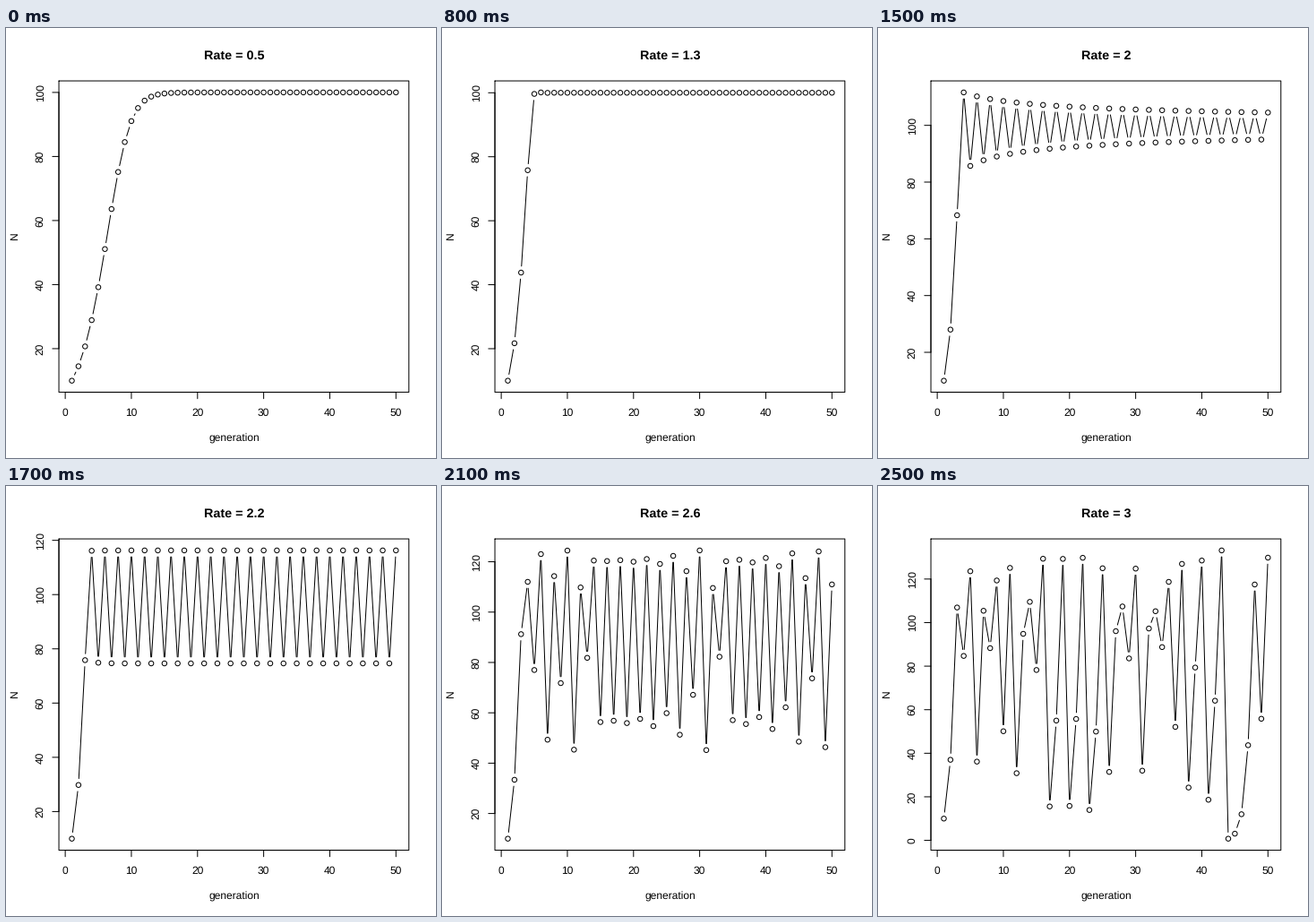
Animation of 480 by 480 pixels, one loop 2.6 s. Source, as a matplotlib script:

```python
import numpy as np
import matplotlib.pyplot as plt
from matplotlib.animation import FuncAnimation
from matplotlib.collections import LineCollection, PatchCollection
from matplotlib.patches import Circle

SIZE, DPI = 480, 72          # at 72 dpi one point is one pixel
LINE = 14.4                  # height of one margin line
LEFT, RIGHT = 4.1 * LINE, SIZE - 2.1 * LINE
TOP, BOTTOM = 4.1 * LINE, SIZE - 5.1 * LINE
MID_X, MID_Y = (LEFT + RIGHT) / 2, (TOP + BOTTOM) / 2
TICK, GAP, RADIUS = 7.2, 7.2, 2.7
CAPACITY, START, GENERATIONS = 100, 10, 50
FRAMES, INTERVAL = 26, 100

plt.rcParams.update({
    "font.family": "Liberation Sans",
    "font.size": 12,
    "text.hinting": "none",
    "toolbar": "None",
})

fig = plt.figure(figsize=(SIZE / DPI, SIZE / DPI), dpi=DPI, facecolor="white")
ax = fig.add_axes([0, 0, 1, 1])


def population(rate):
    """Discrete logistic growth."""
    n = [float(START)]
    for _ in range(GENERATIONS - 1):
        n.append(n[-1] + rate * n[-1] * (1 - n[-1] / CAPACITY))
    return np.array(n)


def padded(values):
    low, high = min(values), max(values)
    pad = 0.04 * (high - low)
    return low - pad, high + pad


def rescale(values, limits, start, end):
    low, high = limits
    return start + (np.asarray(values) - low) / (high - low) * (end - start)


def label(x, y, text, **style):
    ax.text(x, y, text, ha="center", va="baseline",
            rotation_mode="anchor", **style)


def strokes(segments):
    lines = LineCollection(segments, colors="black", linewidths=1,
                           capstyle="round")
    lines.set_snap(False)
    ax.add_collection(lines)


def draw_frame(xlim, ylim):
    corners = [(LEFT, TOP), (RIGHT, TOP), (RIGHT, BOTTOM), (LEFT, BOTTOM)]
    strokes([corners + corners[:1]])

    x_values = np.arange(0, 51, 10)
    xs = rescale(x_values, xlim, LEFT, RIGHT)
    strokes([[(xs[0], BOTTOM), (xs[-1], BOTTOM)]])
    strokes([[(x, BOTTOM), (x, BOTTOM + TICK)] for x in xs])
    for value, x in zip(x_values, xs):
        label(x, BOTTOM + 1.8 * LINE, str(value))

    y_values = np.arange(np.ceil(ylim[0] / 20) * 20, ylim[1], 20).astype(int)
    ys = rescale(y_values, ylim, BOTTOM, TOP)
    strokes([[(LEFT, ys[0]), (LEFT, ys[-1])]])
    strokes([[(LEFT, y), (LEFT - TICK, y)] for y in ys])
    for value, y in zip(y_values, ys):
        label(LEFT - 1.2 * LINE, y, str(value), rotation=90)


def draw_series(points):
    """Circles joined by lines that stop short of them."""
    segments = []
    for a, b in zip(points, points[1:]):
        length = np.hypot(*(b - a))
        if length > 2 * GAP:
            inset = (b - a) * GAP / length
            segments.append([a + inset, b - inset])
    strokes(segments)
    ax.add_collection(PatchCollection(
        [Circle(p, RADIUS) for p in points],
        facecolors="none", edgecolors="black", linewidths=1))


def draw(frame):
    ax.clear()
    ax.set(xlim=(0, SIZE), ylim=(SIZE, 0))
    ax.axis("off")

    rate = 0.5 + 0.1 * frame
    generation = np.arange(1, GENERATIONS + 1)
    n = population(rate)
    xlim, ylim = padded(generation), padded(n)

    draw_frame(xlim, ylim)
    draw_series(np.column_stack([
        rescale(generation, xlim, LEFT, RIGHT),
        rescale(n, ylim, BOTTOM, TOP)]))

    label(MID_X, 34.8, f"Rate = {rate:g}", fontsize=14.4, weight="bold")
    label(MID_X, BOTTOM + 3.8 * LINE, "generation")
    label(LEFT - 3.2 * LINE, MID_Y, "N", rotation=90)
    return []


animation = FuncAnimation(fig, draw, frames=FRAMES, init_func=lambda: [],
                          interval=INTERVAL, repeat=True, repeat_delay=0)
plt.show()
```
